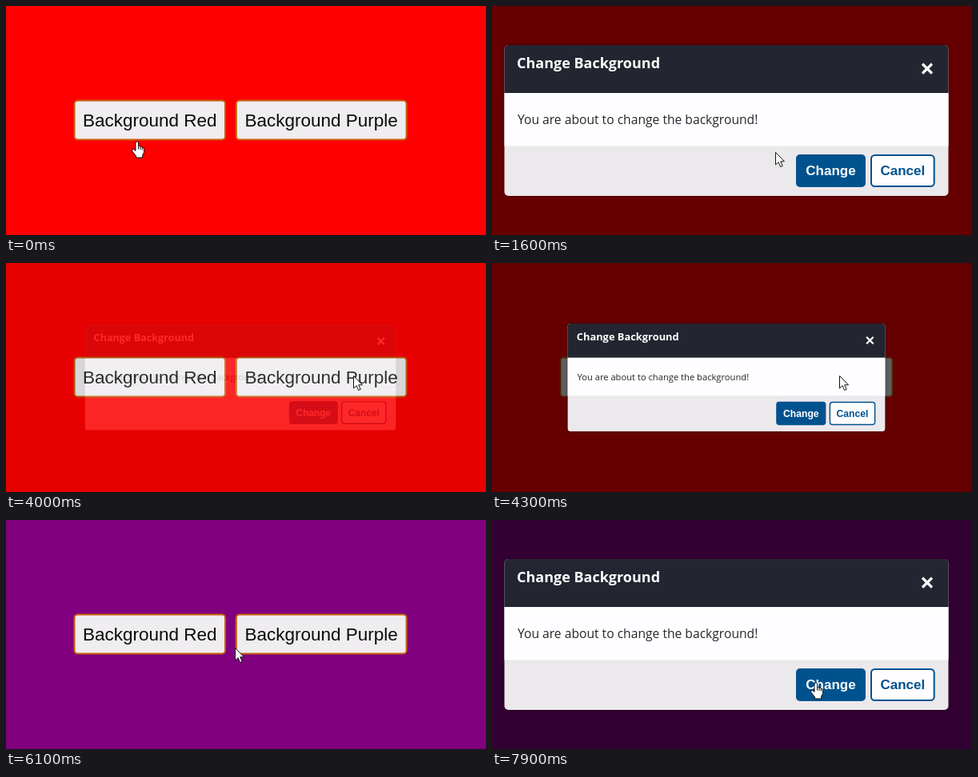
An HTML page with a canvas for the animation above (8000 ms loop, 600 by 287 pixels).

```html
<!DOCTYPE html>
<html lang="en">
<head>
<meta charset="utf-8">
<title>Change Background</title>
<style>
  html, body { margin: 0; width: 100%; height: 100%; overflow: hidden; background: #f00; }
  canvas { display: block; }
</style>
</head>
<body>
<canvas id="stage" width="600" height="287"></canvas>
<script>
const W = 600, H = 287, LOOP = 8000, STEP = 100;
const FADE = 300, ZOOM = 350, SMALL = 0.7;
const CX = 293, CY = 143.4;
const RED = '#ff0000', PURPLE = '#800080', BLUE = '#00528f';
const SANS = '"Liberation Sans", Arial, sans-serif';
const OPEN = '"Open Sans", sans-serif';

const ctx = document.getElementById('stage').getContext('2d');
const layer = document.createElement('canvas');
layer.width = W;
layer.height = H;
const dlg = layer.getContext('2d');

// When each dialog starts to fade in and when it is dismissed
const dialogs = [
  { open: 720, close: 2800 },
  { open: 3953, close: 5500 },
  { open: 6584, close: LOOP }
];

// Pointer path: time, x, y
const path = [
  [0, 163, 169], [600, 190, 130], [1100, 190, 130], [1900, 430, 208],
  [2200, 434, 208], [2700, 452, 190], [2900, 452, 190], [3700, 434, 141],
  [4400, 434, 141], [5100, 407, 199], [5700, 407, 198], [6400, 207, 136],
  [6900, 207, 136], [7600, 404, 203], [LOOP, 404, 203]
];

const HAND = new Path2D('M-1.5 1.5Q.3-.8 2 1.5V6.2Q3.6 5.4 4.4 7Q6 6.4 6.8 8Q9 7.4 9 10V14L7.2 17.5V20.5H-1V18.5L-5.8 12.2Q-6.2 9.4-3.8 10L-1.5 12Z');
const KNUCKLES = new Path2D('M2 6V10M4.4 7V10.5M6.8 8V11');
const ARROW = new Path2D('M0 0V15.5L3.6 12.2L6.1 18L8.7 16.9L6.2 11.3H11Z');
const IBEAM = new Path2D('M-4-8.5H-1.2L0-7.5L1.2-8.5H4M0-7.5V8.5M-4 9.5H-1.2L0 8.5L1.2 9.5H4');

const clamp = v => Math.min(1, Math.max(0, v));
const smooth = u => u * u * (3 - 2 * u);
const inside = (x, y, l, t, r, b) => x >= l && x <= r && y >= t && y <= b;

function box(c, x, y, w, h, r, fill, stroke) {
  c.beginPath();
  c.roundRect(x, y, w, h, r);
  c.fillStyle = fill;
  c.fill();
  if (stroke) {
    c.strokeStyle = stroke;
    c.lineWidth = 2;
    c.stroke();
  }
}

function text(c, str, x, y, font, color, align = 'left') {
  c.font = font;
  c.fillStyle = color;
  c.textAlign = align;
  c.fillText(str, x, y);
}

function pageButton(label, x, w) {
  box(ctx, x + 1, 118.5, w - 2, 49, 4, '#efedef', '#c85f08');
  text(ctx, label, x + w / 2, 151, '22.5px ' + SANS, '#0a0a0a', 'center');
}

function drawDialog(scale) {
  dlg.setTransform(1, 0, 0, 1, 0, 0);
  dlg.clearRect(0, 0, W, H);
  dlg.fillStyle = 'rgba(0,0,0,.6)';
  dlg.fillRect(0, 0, W, H);
  dlg.translate(CX, CY);
  dlg.scale(scale, scale);
  dlg.translate(-CX, -CY);

  dlg.shadowColor = 'rgba(0,0,0,.35)';
  dlg.shadowBlur = 5;
  box(dlg, 15.5, 49, 555, 189, 5, '#ebe9ec');
  dlg.shadowColor = 'transparent';
  box(dlg, 15.5, 49, 555, 60, [5, 5, 0, 0], '#232630');
  dlg.fillStyle = '#fefdff';
  dlg.fillRect(15.5, 109, 555, 66.5);

  text(dlg, 'Change Background', 31, 78, 'bold 18px ' + OPEN, '#fff');
  text(dlg, 'You are about to change the background!', 32, 148, '15.65px ' + OPEN, '#27272b');

  dlg.strokeStyle = '#fff';
  dlg.lineWidth = 3.2;
  dlg.stroke(new Path2D('M538 72.5L550 84.5M550 72.5L538 84.5'));

  const bold = 'bold 17px ' + SANS;
  box(dlg, 380, 186, 87, 41, 5, BLUE);
  text(dlg, 'Change', 423.5, 212.3, bold, '#fff', 'center');
  box(dlg, 474, 187, 78.7, 39, 4.5, '#fefdff', BLUE);
  text(dlg, 'Cancel', 513.3, 212.3, bold, BLUE, 'center');
}

function pointerAt(t) {
  let i = 1;
  while (i < path.length - 1 && path[i][0] < t) i++;
  const [t0, x0, y0] = path[i - 1], [t1, x1, y1] = path[i];
  const k = smooth(clamp((t - t0) / (t1 - t0)));
  return [x0 + (x1 - x0) * k, y0 + (y1 - y0) * k];
}

function pointerKind(x, y, open, scale) {
  if (!open) {
    const over = inside(x, y, 84, 117, 275, 169.5) || inside(x, y, 287, 117, 501, 169.5);
    return over ? 'hand' : 'arrow';
  }
  const mx = CX + (x - CX) / scale, my = CY + (y - CY) / scale;
  if (inside(mx, my, 380, 186, 553.5, 227)) return 'hand';
  if (inside(mx, my, 32, 131, 332, 156)) return 'beam';
  return 'arrow';
}

function drawPointer(x, y, kind) {
  ctx.save();
  ctx.translate(Math.round(x) + 0.5, Math.round(y) + 0.5);
  ctx.lineJoin = 'round';
  ctx.strokeStyle = '#111';
  ctx.lineWidth = 1;
  if (kind === 'beam') {
    ctx.lineWidth = 1.6;
    ctx.stroke(IBEAM);
  } else {
    const shape = kind === 'hand' ? HAND : ARROW;
    ctx.fillStyle = '#fff';
    ctx.fill(shape);
    ctx.stroke(shape);
    if (kind === 'hand') ctx.stroke(KNUCKLES);
  }
  ctx.restore();
}

function draw(t) {
  ctx.fillStyle = t < dialogs[1].close ? RED : PURPLE;
  ctx.fillRect(0, 0, W, H);
  pageButton('Background Red', 84.5, 190.5);
  pageButton('Background Purple', 286.8, 214.8);

  const open = dialogs.find(d => t >= d.open && t < d.close);
  let scale = 1;
  if (open) {
    const age = t - open.open;
    scale = SMALL + (1 - SMALL) * smooth(clamp((age - FADE) / ZOOM));
    drawDialog(scale);
    ctx.globalAlpha = clamp(age / FADE);
    ctx.drawImage(layer, 0, 0);
    ctx.globalAlpha = 1;
  }

  const [x, y] = pointerAt(t);
  drawPointer(x, y, pointerKind(x, y, open, scale));
}

let start;
function tick(now) {
  if (start === undefined) start = now;
  const t = (now - start + 5) % LOOP;
  draw(Math.floor(t / STEP) * STEP);
  requestAnimationFrame(tick);
}
requestAnimationFrame(tick);
</script>
</body>
</html>
```
